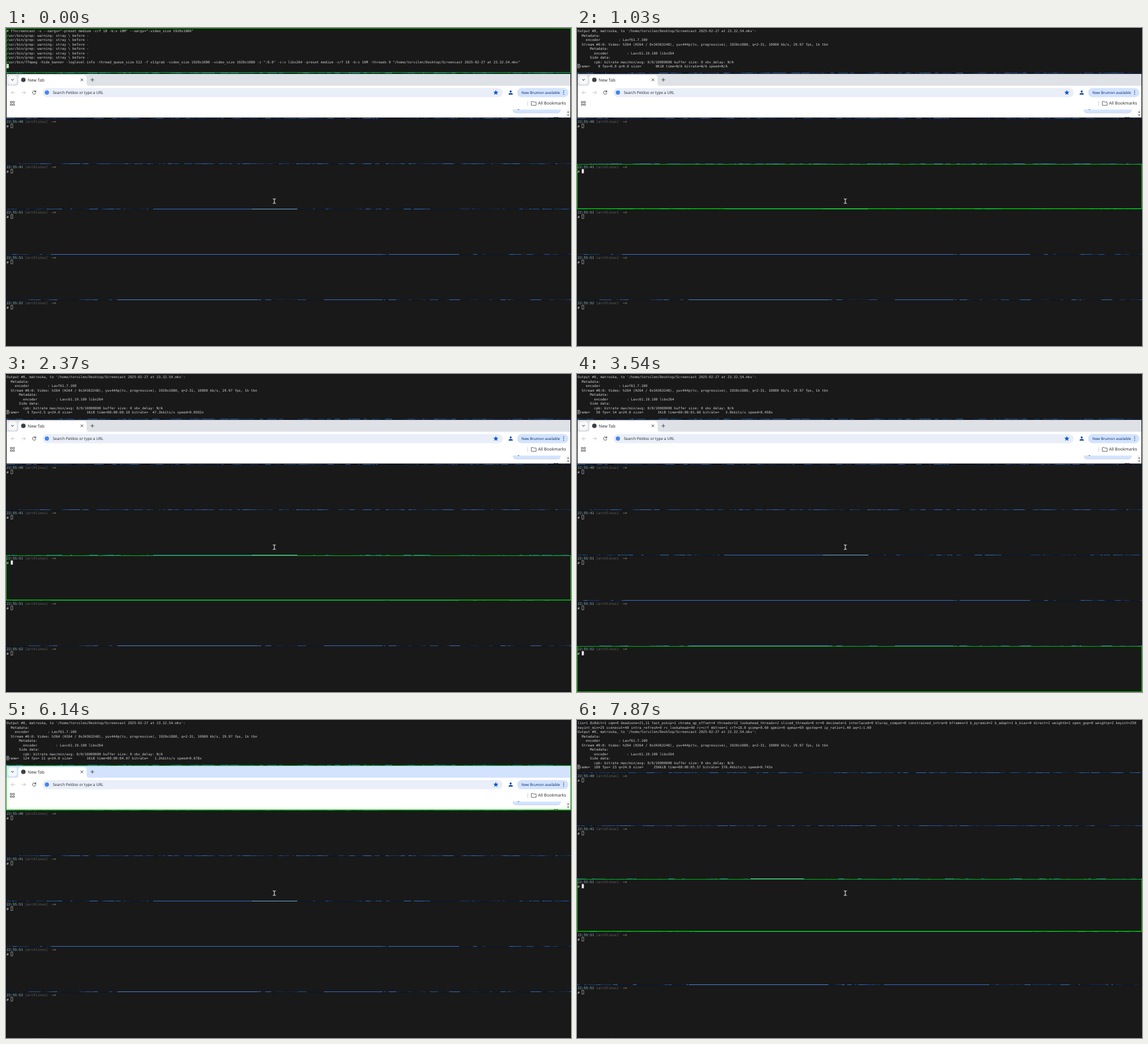
Recreate the animation shown at these times as an HTML page. Size 960 by 540 pixels, loop 8 s.

```html
<!DOCTYPE html>
<html lang="en">
<head>
<meta charset="utf-8">
<title>Tiled terminals</title>
<style>
html, body { margin: 0; width: 100%; height: 100%; overflow: hidden; background: #09131f; }
svg { display: block; width: 100vw; height: 100vh; }
text { white-space: pre; text-rendering: geometricPrecision; }
.term { font: 5.814px "DejaVu Sans Mono", monospace; }
.ui { font-family: "Noto Sans", sans-serif; fill: #303134; }
.line { fill: none; stroke-linecap: round; stroke-linejoin: round; }
</style>
</head>
<body>
<svg viewBox="0 0 960 540">
  <defs>
    <path id="beam" d="M453.7 290q2.2 0 2.2 1.2v5.600q0 1.200-2.200 1.200M458.100 290q-2.200 0-2.200 1.200v5.600q0 1.200 2.200 1.200"/>
  </defs>
  <g id="wide"></g>
  <g id="tall"></g>
  <g id="top"></g>
  <g id="browser">
    <rect x="1" y="78" width="958" height="74" fill="#fff"/>
    <rect id="strip" x="1" y="78" width="958" height="20" fill="#dee1e6"/>
    <rect x="3.5" y="80.5" width="15" height="15" rx="4.5" fill="#fff" opacity=".75"/>
    <path class="line" d="M9 87l2 2 2-2" stroke="#303134"/>
    <path d="M17 98q4 0 4-4v-9q0-5 5-5h106q5 0 5 5v9q0 4 4 4z" fill="#fff"/>
    <circle cx="29.5" cy="88" r="3.8" fill="#3c4043"/>
    <text class="ui" x="37" y="90.6" font-size="7.1">New Tab</text>
    <path class="line" d="M127 86l4 4m0-4l-4 4M144 88h5.4m-2.7-2.7v5.4" stroke="#303134" stroke-width=".8"/>
    <path class="line" d="M15 109.7H9m2.8-2.8L9 109.7l2.8 2.8M27 109.7h6m-2.8-2.8l2.8 2.8-2.8 2.8" stroke="#b6b8bb" stroke-width=".8"/>
    <path class="line" d="M50.4 108a2.9 2.9 0 1 0 .3 2.6M50.7 106.2v2.3h-2.3" stroke="#3c4043" stroke-width=".9"/>
    <rect x="62" y="102" width="782" height="15.5" rx="7.7" fill="#e9eef8"/>
    <circle cx="69.5" cy="109.6" r="3.6" fill="#4285f4"/>
    <text class="ui" x="79.4" y="112" font-size="6.5">Search Peldoo or type a URL</text>
    <path d="M832.3 105.3l1.2 2.9 3.1.2-2.4 2 .8 3.1-2.7-1.7-2.7 1.7.8-3.1-2.4-2 3.1-.2z" fill="#0b57d0"/>
    <g fill="#174ea6">
      <circle cx="857.5" cy="107.8" r="1.8"/>
      <path d="M854 113.2v-1q0-2 3.5-2t3.5 2v1z"/>
    </g>
    <rect x="868.5" y="102" width="87" height="15.5" rx="7.7" fill="#d3e3fd"/>
    <text class="ui" x="875.8" y="112" font-size="6.2" style="fill:#0a2f72">New Brumon available</text>
    <path class="line" d="M947.5 106.8v0m0 2.8v0m0 2.8v0" stroke="#0a2f72" stroke-width="1.5"/>
    <path class="line" d="M7.7 124.7H10V127H7.7zM12 124.7h2.3v2.3H12zM7.7 129H10v2.3H7.700zM12 129h2.300v2.300H12z" stroke="#474747" stroke-width=".8"/>
    <path d="M886.5 124v8" stroke="#c4d4ee"/>
    <path class="line" d="M893 124.8h2.8l1 1h4v5.5H893z" stroke="#474747" stroke-width=".8"/>
    <text class="ui" x="904" y="130.4" font-size="7.1">All Bookmarks</text>
    <path d="M860.5 138.5H943q-1 5.7-6 5.7h-70.5q-5 0-6-5.7z" fill="#d3e3fd"/>
    <path d="M862 142q1.5 2.4 4.5 2.4H937q3 0 4.5-2.4" fill="none" stroke="#b9c4d6" stroke-width=".6"/>
    <path d="M869.5 138.5h2.5" stroke="#0b57d0" stroke-width=".8"/>
    <path d="M931 151.5h1.6m1.2 0h1.6m1.2 0h1.6" stroke="#303134"/>
    <rect x="951.5" y="138.5" width="7.5" height="13.5" fill="#f3f3f3"/>
    <path d="M953.4 143.4l1.8-1.9 1.8 1.9zM953.4 147l1.8 1.9 1.8-1.9z" fill="#505050"/>
  </g>
  <rect id="frame" x=".5" width="959" fill="none" stroke="#00b800"/>
  <rect id="edge" width="960" height="1" fill="#00b800" opacity=".6"/>
  <use href="#beam" class="line" stroke="#111" stroke-width="2.2"/>
  <use href="#beam" class="line" stroke="#eee" stroke-width="1.1"/>
</svg>
<script>
const LOOP = 8000, CHAR = 3.5, ROW = 7.5, CLOSE = 7570;
const NS = 'http://www.w3.org/2000/svg';
const $ = id => document.getElementById(id);

function add(parent, tag, attrs, text) {
  const el = document.createElementNS(NS, tag);
  for (const key in attrs) el.setAttribute(key, attrs[key]);
  if (text) el.textContent = text;
  parent.appendChild(el);
  return el;
}
const show = (el, on) => el.setAttribute('display', on ? 'inline' : 'none');
const print = (parent, row, text, y = 0, col = 0, fill = '#cfcfcf') =>
  add(parent, 'text', { class: 'term', x: 1 + col * CHAR, y: y + 7 + row * ROW, fill }, text);
const block = (parent, col, row, y = 0) =>
  add(parent, 'rect', { x: 1.25 + col * CHAR, y: y + 1.4 + row * ROW, width: 3.1, height: 6.6, 'stroke-width': .55, stroke: '#d8d8d8' });
const lit = (el, on) => el.setAttribute('fill', on ? '#eee' : 'none');

function random(seed) {
  return () => (seed = (seed * 16807) % 2147483647) / 2147483647;
}

// One-pixel slice of wallpaper seen between two panes.
function gap(parent, y, density, bars, seed) {
  const rnd = random(seed * 7919 + 13), tones = ['#14294d', '#1b3a6e', '#28559f', '#3a6cb8'];
  const dash = (x, w, fill) => add(parent, 'rect', { x, y: y - 1, width: w, height: 1, fill });
  dash(0, 960, '#0c1a30');
  for (let x = 0; x < 960;) {
    const w = 1 + rnd() * rnd() * 18;
    if (rnd() < density) dash(x, w, tones[Math.floor(rnd() * tones.length)]);
    x += w;
  }
  for (const [a, b, tone = '#3a6fbe'] of bars) dash(a, b - a, tone);
}

const clocks = ['22:55:40', '22:55:41', '22:55:51', '22:55:51', '22:55:52'];

function layout(parent, step, first, gaps) {
  const count = first + clocks.length;
  const cursors = [];
  for (let k = 0; k < count; k++) {
    const y = k * step, end = k === count - 1 ? 539.5 : y + step - 1;
    add(parent, 'rect', { x: .5, y: y + .5, width: 959, height: end - y - .5, fill: '#191919' });
    if (k) gap(parent, y, gaps[k] ? .5 : .85, gaps[k] || [], k + step);
    if (k < first) continue;
    print(parent, 0, clocks[k - first], y, 0, '#8db7c4');
    print(parent, 0, '[archlinux]', y, 9, '#626262');
    print(parent, 0, '~>', y, 22, '#c9bf8b');
    print(parent, 1, '#', y);
    cursors[k] = block(parent, 2, 1, y);
  }
  add(parent, 'path', { d: 'M10 484L60 536', stroke: '#1e1e1e', 'stroke-width': .7 });
  return cursors;
}

const bright = '#75add8', mid = '#4c84c8';
const wideCursors = layout($('wide'), 77, 2, {
  4: [[250, 418], [418, 495, bright]], 5: [[80, 640], [650, 770]], 6: [[190, 427, mid], [540, 640]]
});
const tallCursors = layout($('tall'), 90, 1, {
  3: [[295, 385, bright]], 4: [[200, 770]], 5: [[190, 426, mid], [522, 700]]
});

const intro = [
  '# ffscreencast -s --oargs="-preset medium -crf 18 -b:v 10M" --sargs="-video_size 1920x1080"',
  ...Array(6).fill('/usr/bin/grep: warning: stray \\ before -'),
  '/usr/bin/ffmpeg -hide_banner -loglevel info -thread_queue_size 512 -f x11grab -video_size 1920x1080 -video_size 1920x1080 -i ":0.0" -c:v libx264 -preset medium -crf 18 -b:v 10M -threads 0 "/home/torvilen/Desktop/Screencast 2025-02-27 at 23.32.54.mkv"'
];
const options = [
  'lis=1 8x8dct=1 cqm=0 deadzone=21,11 fast_pskip=1 chroma_qp_offset=4 threads=12 lookahead_threads=2 sliced_threads=0 nr=0 decimate=1 interlaced=0 bluray_compat=0 constrained_intra=0 bframes=3 b_pyramid=2 b_adapt=1 b_bias=0 direct=1 weightb=1 open_gop=0 weightp=2 keyint=250',
  'keyint_min=25 scenecut=40 intra_refresh=0 rc_lookahead=40 rc=crf mbtree=1 crf=18.0 qcomp=0.60 qpmin=0 qpmax=69 qpstep=4 ip_ratio=1.40 aq=1:1.00'
];
const output = [
  "Output #0, matroska, to '/home/torvilen/Desktop/Screencast 2025-02-27 at 23.32.54.mkv':",
  '  Metadata:',
  '    encoder         : Lavf61.7.100',
  '  Stream #0:0: Video: h264 (H264 / 0x34363248), yuv444p(tv, progressive), 1920x1080, q=2-31, 10000 kb/s, 29.97 fps, 1k tbn',
  '      Metadata:',
  '        encoder         : Lavc61.19.100 libx264',
  '      Side data:',
  '        cpb: bitrate max/min/avg: 0/0/10000000 buffer size: 0 vbv_delay: N/A'
];

const rows = [...Array(11).keys()].map(i => print($('top'), i, ' '));
const topCursors = [8, 10].map(row => block($('top'), 0, row));

// Encoder status line, refreshed twice a second.
function status(t) {
  if (t < 540) return '';
  const tick = Math.floor((t - 3540) / 500);
  if (tick < -3) return 'frame=    0 fps=0.0 q=0.0 size=       0KiB time=N/A bitrate=N/A speed=N/A';
  const frames = 49 + 15 * tick + (tick < 1 ? 1 : 0);
  const elapsed = 3.496 + tick * .5008, secs = (frames - 2) / 29.97;
  const full = tick >= 6, kbits = full ? 2097.15 : 4.73;
  const fps = frames / elapsed;
  const pad = (v, n) => String(v).padStart(n);
  const clock = (Math.floor(secs * 100) / 100).toFixed(2).padStart(5, '0');
  return `frame=${pad(frames, 5)} fps=${pad(fps.toFixed(fps < 9.95 ? 1 : 0), 3)} q=24.0 size=${pad(full ? 256 : 1, 8)}KiB` +
    ` time=00:00:${clock} bitrate=${pad((kbits / secs).toFixed(1), 6)}kbits/s speed=${(secs / elapsed).toPrecision(3)}x`;
}

// Start time and index of each focused pane.
const focusSteps = [
  [0, 0], [440, 1], [740, 2], [1000, 3], [1170, 4], [1340, 5], [1500, 6], [1670, 0],
  [1830, 1], [2000, 2], [2170, 3], [2340, 4], [2500, 5], [2670, 6], [4400, 0], [4740, 1], [CLOSE, 3]
];

let shown = '';
function draw(t) {
  const closed = t >= CLOSE;
  const [since, focus] = focusSteps.findLast(s => t >= s[0]);
  const lines = t < 140 ? intro : [...(closed ? options : []), ...output, status(t)];
  const text = lines.join('\n');
  if (text !== shown) {
    rows.forEach((row, i) => row.textContent = lines[i] || '');
    shown = text;
  }
  show($('wide'), !closed);
  show($('tall'), closed);
  show($('browser'), !closed);
  topCursors.forEach((c, i) => { show(c, closed === (i === 1)); lit(c, focus === 0); });
  (closed ? tallCursors : wideCursors).forEach((c, k) => lit(c, k === focus));
  $('strip').setAttribute('fill', focus === 1 && t - since > 90 ? '#d3e3fd' : '#dee1e6');

  const step = closed ? 90 : 77, last = focus === 6;
  const top = focus * step + .5;
  const bottom = last ? 539.5 : (focus + 1) * step - 1.5;
  $('frame').setAttribute('y', top);
  $('frame').setAttribute('height', bottom - top);
  $('edge').setAttribute('y', bottom + .5);
  show($('edge'), !last && focus > 0);
}

const start = performance.now();
function loop() {
  draw((performance.now() - start) % LOOP);
  requestAnimationFrame(loop);
}
loop();
</script>
</body>
</html>
```
